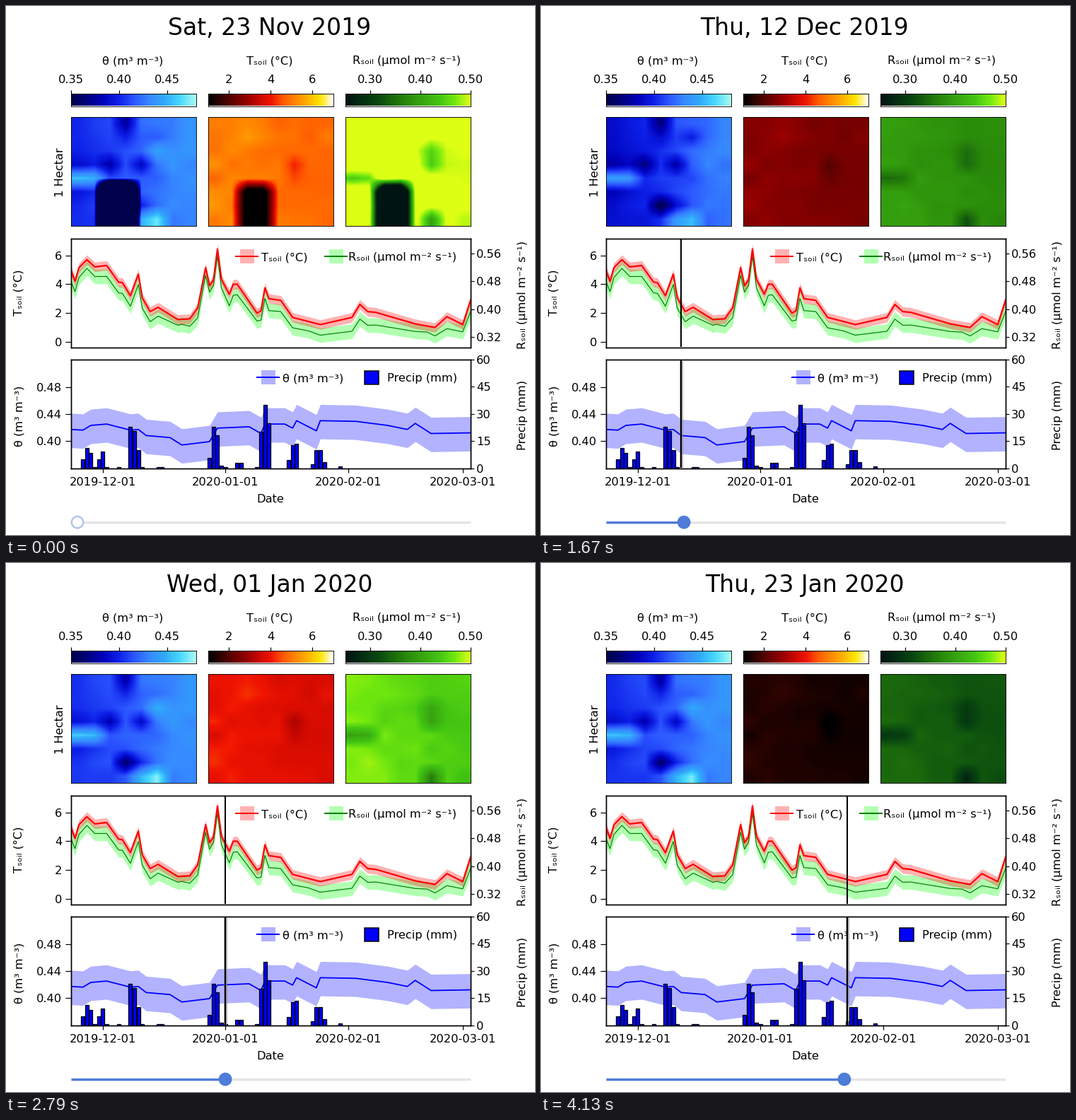
A matplotlib script that plays this animation: 748 by 748 pixels, repeating every 4.18 s.

```python
import numpy as np
import matplotlib.pyplot as plt
from matplotlib import dates
from matplotlib.animation import FuncAnimation
from matplotlib.colors import LinearSegmentedColormap
from matplotlib.patches import Circle, Rectangle

W = H = 748
PX = 0.72  # points per pixel at 100 dpi
FRAMES, STEP = 110, 38
DAYS = 101
START = dates.date2num(np.datetime64("2019-11-23"))

plt.rcParams.update({
    "font.family": "DejaVu Sans", "font.size": 16.2 * PX,
    "axes.linewidth": 1.4 * PX, "xtick.major.width": 1.2 * PX,
    "ytick.major.width": 1.2 * PX,
})

THETA = "θ (m³ m⁻³)"
T_SOIL = "Tₛₒᵢₗ (°C)"
R_SOIL = "Rₛₒᵢₗ (µmol m⁻² s⁻¹)"

# ---- daily series -------------------------------------------------------
days = np.arange(DAYS + 1)


def series(knots):
    return np.interp(days, list(knots), list(knots.values()))


temp = series({
    0: 4.95, 1: 4.2, 2: 5.15, 4: 5.7, 6: 5.2, 9: 5.3, 12: 4.15, 13: 4.1,
    15: 3.2, 17: 4.7, 18: 3.05, 20: 2.1, 22: 2.4, 27: 1.55, 30: 1.6, 32: 2.35,
    34: 5.15, 35: 3.9, 36: 4.3, 37: 6.45, 38: 4.35, 40: 3.3, 41: 4, 42: 4,
    47: 2, 48: 2.15, 49: 3.75, 50: 3, 53: 2.88, 56: 1.7, 63: 1.2, 71: 1.7,
    73: 2.6, 75: 2.1, 77: 2.05, 87: 1.25, 92: 1, 95: 1.75, 99: 1.2, 101: 2.9})

gap = series({0: .75, 4: .6, 9: .76, 20: .7, 28: .35, 32: .68, 36: .38,
              40: .8, 47: .55, 50: .83, 60: .65, 73: 1.02, 90: .42, 95: .83,
              99: .5, 101: .78})

moist = series({
    0: .417, 3: .416, 5: .423, 9: .425, 15: .416, 17: .417, 19: .408,
    25: .405, 28: .394, 35: .399, 37: .419, 45: .421, 48: .411, 49: .425,
    54: .425, 56: .419, 57: .43, 62: .415, 63: .43, 72: .429, 80: .423,
    85: .417, 87: .426, 91: .411, 101: .412})


def to_resp(t):
    return 0.306 + 0.0415 * t


resp = to_resp(temp - gap)

# first day of each wet spell: daily precipitation in mm
rain = {3: [5, 11, 8.5], 7: [5, 9], 15: [22.7, 20.5, 10],
        35: [5.7, 23, 18, 1.4], 42: [3, 3], 48: [20, 35, 25],
        55: [4.5, 12.7, 13.4], 61: [2, 10, 10, 3.3], 68: [1]}
drizzle = [6, 9, 12, 18, 22, 23, 39, 47]


# ---- sensor grid --------------------------------------------------------
def grid(tilt, noise, seed, spots):
    """8 x 8 offsets: west-east tilt, small noise and single sensors."""
    g = np.random.default_rng(seed).normal(0, noise, (8, 8))
    g += tilt * (np.arange(8) - 3.5)
    for cell, v in spots.items():
        g[cell] += v
    return g


wet = grid(.0045, .004, 1, {
    (0, 3): -.035, (1, 3): -.018, (2, 5): .028, (3, 2): -.032,
    (3, 4): -.036, (4, 0): .058, (4, 1): .038, (6, 3): -.055,
    (6, 4): -.024, (7, 4): .03, (7, 5): .05})
dry = grid(.002, 0, 1, {(1, 5): -.028, (2, 5): -.03, (7, 5): -.02})
warm = grid(-.06, .13, 4, {(1, 2): .4, (3, 5): -.5, (4, 5): -.3,
                           (4, 0): -.25})
active = grid(-.006, .008, 7, {(4, 0): -.09, (4, 1): -.07, (2, 5): -.06,
                               (3, 5): -.07, (7, 5): -.11})


def maps(day):
    t, r, m = temp[day], resp[day], moist[day]
    dryness = np.clip((.422 - m) / .02, 0, 1)
    level = np.clip((r - .38) / .1, 0, 1)
    fields = [m + wet + dryness * dry,
              t + warm * (.35 + .13 * t),
              r + .04 * level + active * (.5 + .5 * level)]
    if day < 3:  # sensors without data yet
        for f in fields:
            f[5:, 2:4] = 0
    return fields


def cmap(name, *colors):
    return LinearSegmentedColormap.from_list(name, colors)


BLUES = cmap("blues", "#00004b", "#00007d", "#0000b9", "#0c1ee6", "#2b55ff",
             "#3788ff", "#30aafa", "#48d8ff", "#aafaf0")
FIRE = cmap("fire", "#000000", "#320400", "#640200", "#920000", "#c60700",
            "#f01400", "#ff5a00", "#ff8700", "#ffb300", "#ffe600", "#ffffff")
GREENS = cmap("greens", "#001414", "#042d12", "#084610", "#1b690c", "#2a8c0a",
              "#39a811", "#42c413", "#70e80f", "#dcff14")

# ---- layout -------------------------------------------------------------
fig = plt.figure(figsize=(W / 100, H / 100), dpi=100, facecolor="white")


def panel(x, y, w, h):
    return fig.add_axes([x / W, 1 - (y + h) / H, w / W, h / H])


stage = panel(0, 0, W, H)
stage.set(xlim=(0, W), ylim=(H, 0), zorder=10)
stage.axis("off")


def label(x, y, s, size=16.2, **kw):
    return stage.text(x, y, s, fontsize=size * PX, **kw)


def mid_label(x, y, s, rotation=90):
    return label(x, y, s, rotation=rotation, ha="center", va="center")


def ticks(axis, at, fmt="%d", length=5, pad=3):
    axis.set_ticks(at, [fmt % v for v in at])
    axis.set_tick_params(length=length * PX, pad=pad * PX)


images = []
columns = [
    (92, THETA, BLUES, .35, .48, [.35, .40, .45], "%.2f"),
    (286, T_SOIL, FIRE, 1, 7, [2, 4, 6], "%d"),
    (480, R_SOIL, GREENS, .25, .50, [.30, .40, .50], "%.2f"),
]
for (x, name, cm, lo, hi, at, fmt), field in zip(columns, maps(0)):
    bar = panel(x, 124, 176.5, 17.5)
    bar.imshow(np.linspace(0, 1, 256)[None], cmap=cm, aspect="auto",
               extent=(lo, hi, 0, 1))
    bar.set_yticks([])
    bar.xaxis.tick_top()
    ticks(bar.xaxis, at, fmt, 5, 7)
    label(x + 87, 82, name, ha="center")

    ax = panel(x, 157, 176.5, 154)
    images.append(ax.imshow(field, cmap=cm, vmin=lo, vmax=hi, aspect="auto",
                            interpolation="bilinear"))
    ax.set(xticks=[], yticks=[])
    for s in (*bar.spines.values(), *ax.spines.values()):
        s.set_linewidth(.9 * PX)

mid_label(77, 235, "1 Hectar")


def band(ax, y, below, above, fill, line, width):
    ax.fill_between(days, y - below, y + above, color=fill, alpha=.3, lw=0)
    ax.plot(days, y, color=line, lw=width * PX)


# temperature and respiration
t_lim = np.array([-.37, 7.16])
ax_t = panel(92, 329, 565, 153.5)
ax_r = ax_t.twinx()
ax_t.set(xlim=(0, DAYS), ylim=t_lim, xticks=[], zorder=2)
ax_r.set_ylim(to_resp(t_lim))
ax_t.patch.set_visible(False)
band(ax_r, resp, .021, .021, "lime", "green", 1.2)
band(ax_t, temp, .33, .33, "red", "red", 2.2)
ticks(ax_t.yaxis, [0, 2, 4, 6], "%d", 8, 5)
ticks(ax_r.yaxis, [.32, .40, .48, .56], "%.2f")
mid_label(18, 405, T_SOIL)
mid_label(731, 408, R_SOIL)

# moisture and precipitation
ax_m = panel(92, 500, 565, 153.5)
ax_p = ax_m.twinx()
ax_m.set(xlim=(0, DAYS), ylim=(.3597, .5204))
ax_p.set_ylim(0, 60)
band(ax_m, moist, .027, .024, "blue", "blue", 1.8)


def rain_bars(x, mm):
    ax_p.bar(x, mm, width=.9, color="blue", edgecolor="black",
             linewidth=1.3 * PX)


for first, mm in rain.items():
    rain_bars(first + np.arange(len(mm)), mm)
rain_bars(drizzle, .4)
ticks(ax_m.yaxis, [.40, .44, .48], "%.2f", 8, 5)
ticks(ax_p.yaxis, range(0, 61, 15))
ticks(ax_m.xaxis, [], "%d", 6, 7)
months = ["2019-12-01", "2020-01-01", "2020-02-01", "2020-03-01"]
ax_m.set_xticks([dates.datestr2num(m) - START for m in months], months)
mid_label(19, 580, THETA)
mid_label(731, 579, "Precip (mm)")
mid_label(374, 698, "Date", 0)


# ---- legends ------------------------------------------------------------
def rail(x0, x1, y, color, width, **kw):
    return stage.plot([x0, x1], [y, y], color=color, lw=width * PX,
                      solid_capstyle="butt", **kw)[0]


def band_key(x, y, fill, line, text, dx=37):
    stage.add_patch(Rectangle((x + 7, y - 10), 20, 20, color=fill, alpha=.3,
                              lw=0))
    rail(x, x + 33, y, line, 2)
    label(x + dx, y + 6, text)


band_key(324, 354, "red", "red", T_SOIL)
band_key(450, 354, "lime", "green", R_SOIL, 34)
band_key(354, 525, "blue", "blue", THETA)
stage.add_patch(Rectangle((507.5, 515.5), 19.5, 19.5, fc="blue", ec="black",
                          lw=1.5 * PX))
label(539, 531, "Precip (mm)")

# ---- moving parts -------------------------------------------------------
title = label(373, 41, "", 33.1, ha="center")


def cursor(y0, y1, color, width, alpha=1):
    return stage.plot([92, 92], [y0, y1], color=color, lw=width * PX,
                      alpha=alpha, solid_capstyle="butt")[0]


cursors = [cursor(501, 653, "gray", 5, .6), cursor(329, 482, "black", 2),
           cursor(501, 653, "black", 2)]

BLUE, PALE = "#4f7bd9", "#afc3e8"
rail(92, 657, 730, "#e5e5e5", 3.4)
done = rail(92, 92, 730, BLUE, 3.4)
knob = stage.add_patch(Circle((101, 730), 8.2, lw=2.4 * PX, zorder=5))

# playback: slow start, short pause, then uneven play (ms: day)
PLAY = {0: 0, 500: 2.9, 610: 2.9, 1121: 10.5, 1653: 19.5, 2451: 34.5,
        3211: 44.5, 3781: 53.5, 4123: 61.5}


def update(i):
    day = int(np.interp((i + .5) * STEP, list(PLAY), list(PLAY.values())))
    title.set_text(dates.num2date(START + day).strftime("%a, %d %b %Y"))
    for im, field in zip(images, maps(day)):
        im.set_data(field)
    x = 92 + 565 * day / DAYS
    for c in cursors:
        c.set_xdata([x, x])
        c.set_visible(day > 0)
    sx = max(101, 99.5 + 5.4 * day)
    done.set_xdata([92, sx if day else 92])
    knob.center = sx, 730
    knob.set_facecolor(BLUE if day else "white")
    knob.set_edgecolor(BLUE if day else PALE)
    return [title, *images, *cursors, done, knob]


anim = FuncAnimation(fig, update, frames=FRAMES, interval=STEP, repeat=True,
                     repeat_delay=0, init_func=lambda: update(0))
plt.show()
```
